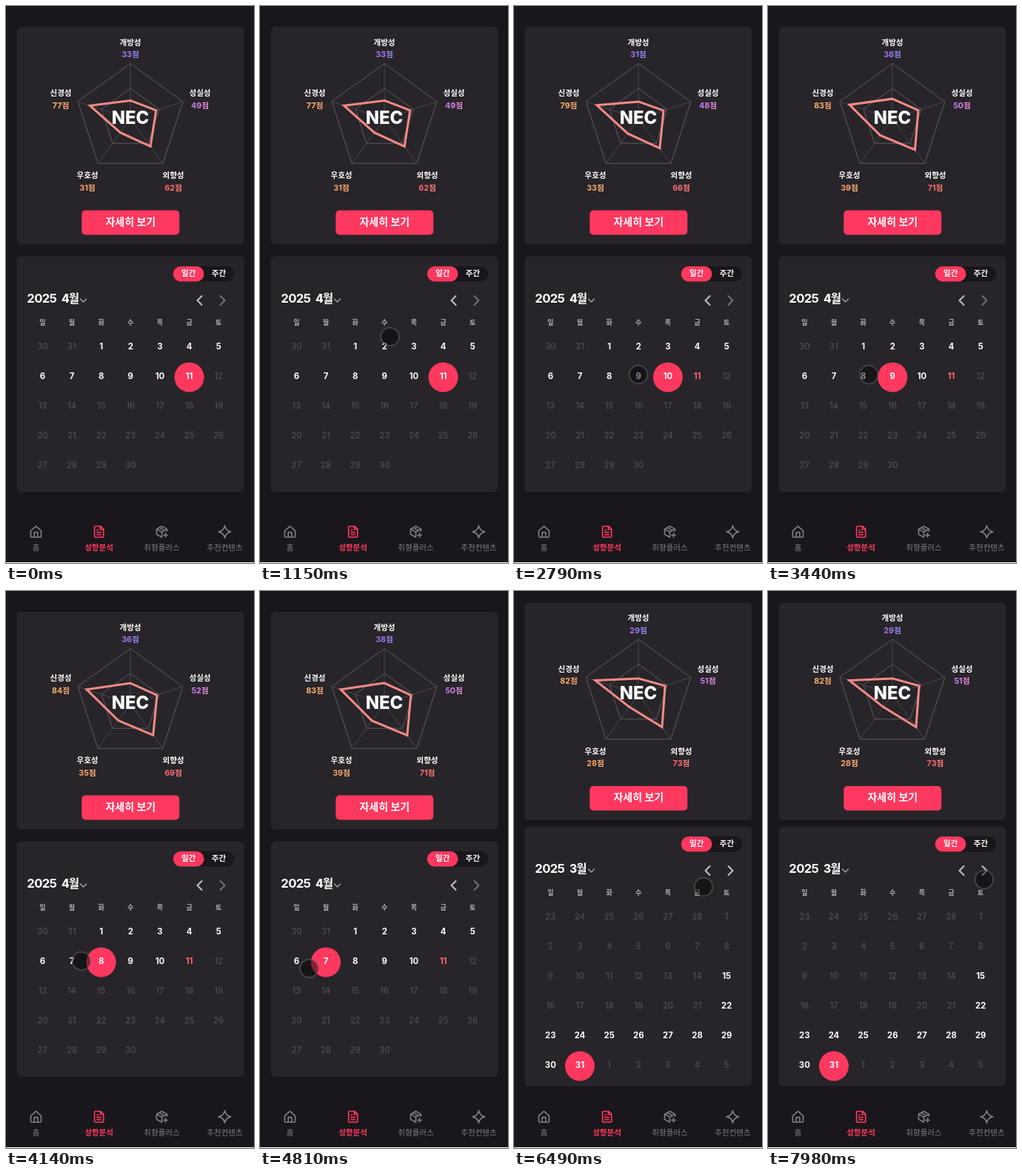
Write an HTML page with a canvas that moves like this. It is 335 px wide and 751 px high and loops after 8 s.

```html
<!DOCTYPE html>
<html lang="ko">
<head>
<meta charset="utf-8">
<title>성향분석</title>
<style>
  html, body { margin: 0; width: 100%; height: 100%; overflow: hidden; background: #19171b; }
  canvas { display: block; width: 335px; height: 751px; }
</style>
</head>
<body>
<canvas id="stage"></canvas>
<script>
const W = 335, H = 751, LOOP = 8000;
const canvas = document.getElementById('stage');
const ctx = canvas.getContext('2d');
const ratio = window.devicePixelRatio || 1;
canvas.width = W * ratio;
canvas.height = H * ratio;

const FAMILY = 'Inter, "Noto Sans CJK KR", "Noto Sans KR", "Noto Sans CJK", sans-serif';
const BG = '#19171b', CARD = '#272529', PINK = '#ff385f', DIM = '#4f4d52', GRAY = '#807e83';

// Scores run clockwise from the top of the chart.
const STATES = [
  { t: 0, day: 11, scores: [33, 49, 62, 31, 77] },
  { t: 2040, day: 10, scores: [31, 48, 66, 33, 79] },
  { t: 3000, day: 9, scores: [38, 50, 71, 39, 83] },
  { t: 3800, day: 8, scores: [36, 52, 69, 35, 84] },
  { t: 4350, day: 7, scores: [38, 50, 71, 39, 83] },
  { t: 5080, day: 6, scores: [34, 53, 71, 23, 84] },
  { t: 6360, day: 31, scores: [29, 51, 73, 28, 82], march: true },
];

// Pointer path: time, x, y. Repeated places are rests.
const PATH = [
  [660, 280, 564], [900, 215, 440], [1300, 166, 462], [1780, 206, 495], [2300, 206, 495],
  [2790, 168, 497], [3200, 168, 497], [3540, 128, 497], [3900, 128, 497],
  [4300, 88, 500], [4650, 88, 500], [4950, 49, 516], [5200, 49, 516],
  [5750, 193, 453], [6250, 256, 399], [6860, 256, 399],
  [7220, 264, 554], [7520, 264, 554], [7800, 296, 388], [7980, 292, 389],
];

const TRAITS = [
  { name: '개방성', x: 168, y: 49.5, colors: ['#a66cf0', '#8d8df2'] },
  { name: '성실성', x: 262, y: 118, colors: ['#b97cf5', '#f08ad8'] },
  { name: '외향성', x: 226, y: 229, colors: ['#ff5c70', '#ff8078'] },
  { name: '우호성', x: 110, y: 229, colors: ['#ff9a66', '#ffb27a'] },
  { name: '신경성', x: 74, y: 118, colors: ['#ffb765', '#ff9f70'] },
];

const TABS = [
  { label: '홈', x: 40.5, icon: 'M3 10.5 12 2.5l9 8V20a1.5 1.5 0 0 1-1.5 1.5h-15A1.5 1.5 0 0 1 3 20zM9 21.5V13h6v8.5' },
  { label: '성향분석', x: 125.5, active: true, icon: 'M6 2.5h9l5 5V20a1.5 1.5 0 0 1-1.5 1.5H6A1.5 1.5 0 0 1 4.5 20V4A1.5 1.5 0 0 1 6 2.5zM14.5 2.5V8H20M8.5 9h2.5M8.5 13h7M8.5 17h7' },
  { label: '취향플러스', x: 210.5, icon: 'M21 11V7.5L12 2.5 3 7.5v9L12 21.5M3 7.5l9 5 9-5M12 12.5v9M7.5 5l9 5M15 18h7M18.5 14.5v7' },
  { label: '추천컨텐츠', x: 295.5, icon: 'M12 1.5q1.8 8.7 10.5 10.5q-8.7 1.8-10.5 10.5q-1.8-8.7-10.5-10.5q8.7-1.8 10.5-10.5z' },
].map(tab => ({ ...tab, icon: new Path2D(tab.icon) }));

function text(str, x, y, size, color, weight = 700, align = 'center', spacing = 0) {
  ctx.font = `${weight} ${size}px ${FAMILY}`;
  ctx.letterSpacing = spacing + 'px';
  ctx.textAlign = align;
  ctx.textBaseline = 'middle';
  ctx.fillStyle = color;
  ctx.fillText(str, x, y);
}

function box(x, y, w, h, r, color) {
  ctx.beginPath();
  ctx.roundRect(x, y, w, h, r);
  ctx.fillStyle = color;
  ctx.fill();
}

function disc(x, y, r, color) {
  ctx.beginPath();
  ctx.arc(x, y, r, 0, Math.PI * 2);
  ctx.fillStyle = color;
  ctx.fill();
}

function line(points, color, width, closed = false) {
  ctx.beginPath();
  points.forEach(([x, y]) => ctx.lineTo(x, y));
  if (closed) ctx.closePath();
  ctx.strokeStyle = color;
  ctx.lineWidth = width;
  ctx.stroke();
}

const spoke = (i, share) => {
  const a = i * Math.PI * 2 / 5 - Math.PI / 2;
  return [168 + 74.5 * share * Math.cos(a), 152 + 74.5 * share * Math.sin(a)];
};
const ring = shares => shares.map((share, i) => spoke(i, share));
const easeInOut = p => p < 0.5 ? 4 * p ** 3 : 1 - 4 * (1 - p) ** 3;

function chartScores(index, t) {
  const state = STATES[index], before = STATES[index - 1];
  if (!before || state.march) return state.scores;
  const eased = easeInOut(Math.min(1, (t - state.t) / 750));
  return state.scores.map((s, i) => before.scores[i] + (s - before.scores[i]) * eased);
}

function drawChart(state, scores) {
  ctx.save();
  if (state.march) ctx.translate(0, -12.5);
  box(14.5, 28, 307, 293.5, 6, CARD);

  for (const share of [1, 0.55]) line(ring(Array(5).fill(share)), '#5d5b60', 1, true);
  for (let i = 0; i < 5; i++) line([[168, 152], spoke(i, 1)], '#48464b', 1);
  ctx.lineJoin = 'miter';
  line(ring(scores.map(s => s / 100)), '#f98a86', 3, true);
  text('NEC', 168, 151.7, 23.8, '#fff', 800);

  TRAITS.forEach(({ name, x, y, colors }, i) => {
    text(name, x, y, 10.5, '#fff', 800);
    const blend = ctx.createLinearGradient(x - 12, 0, x + 12, 0);
    colors.forEach((c, k) => blend.addColorStop(k, c));
    text(state.scores[i] + '점', x, y + 16.5, 10.7, blend);
  });

  box(102.3, 275.5, 132, 33, 5, PINK);
  text('자세히 보기', 168.3, 291.5, 14, '#fff');
  ctx.restore();
}

// In March only the 15th and the days from the 22nd on have results.
function dayCell(slot, march) {
  if (!march) {
    if (slot < 2) return { day: 30 + slot };
    return { day: slot - 1, open: slot <= 12, own: true };
  }
  if (slot < 6) return { day: 23 + slot };
  if (slot > 36) return { day: slot - 36 };
  const day = slot - 5;
  return { day, open: day === 15 || day >= 22, own: true };
}

function drawCalendar({ march, day: picked }) {
  ctx.save();
  if (march) ctx.translate(0, -20);
  box(14.5, 337.5, 307, march ? 350 : 317.5, 6, CARD);

  box(225.7, 351, 82.6, 20.5, 10.25, BG);
  box(225.7, 351, 41.8, 20.5, 10.25, PINK);
  text('일간', 246.7, 361, 10.5, '#fff', 800);
  text('주간', 287.5, 361, 10.5, '#fff', 800);

  text('2025', 28.3, 395, 16.6, '#fff', 700, 'left', -0.6);
  text(march ? '3월' : '4월', 75, 395, 15.5, '#fff', 800, 'left', -1);
  line([[100.5, 395], [104.5, 399], [108.5, 395]], '#a9a7ac', 1.4);
  line([[264.5, 391], [258.5, 397], [264.5, 403]], '#c4c2c6', 2);
  line([[289.5, 391], [295.5, 397], [289.5, 403]], march ? '#c4c2c6' : '#737176', 2);

  const column = i => 49.3 + 39.65 * i;
  [...'일월화수목금토'].forEach((d, i) => text(d, column(i), 427, 9, '#b5b3b7', 800));

  const slots = march ? 42 : 32;
  for (let slot = 0; slot < slots; slot++) {
    const { day, open, own } = dayCell(slot, march);
    const x = column(slot % 7), y = 459.3 + 40 * Math.floor(slot / 7);
    const chosen = own && day === picked;
    if (chosen) disc(x, y + 1.2, 20, PINK);
    const today = !march && own && day === 11 && !chosen;
    text(day, x, y, 11.3, today ? '#ff6670' : open ? '#fff' : DIM, open ? 700 : 500);
  }
  ctx.restore();
}

function drawTabs() {
  for (const { label, x, icon, active } of TABS) {
    const color = active ? PINK : GRAY;
    ctx.save();
    ctx.translate(x - 9.4, 699.5);
    ctx.scale(0.78, 0.78);
    ctx.strokeStyle = color;
    ctx.lineWidth = 2.1;
    ctx.stroke(icon);
    ctx.restore();
    text(label, x, 730.5, 10.5, color, active ? 800 : 500);
  }
}

const same = (a, b) => a[1] === b[1] && a[2] === b[2];

function slope(i, axis) {
  const a = PATH[i - 1], b = PATH[i], c = PATH[i + 1];
  if (!a || !c || same(a, b) || same(b, c)) return 0;
  return (c[axis] - a[axis]) / (c[0] - a[0]);
}

function pointerAt(t) {
  const next = PATH.findIndex(p => p[0] > t);
  if (next < 0) return PATH[PATH.length - 1].slice(1);
  const a = PATH[next - 1], b = PATH[next], span = b[0] - a[0];
  const u = (t - a[0]) / span, v = 1 - u;
  return [1, 2].map(k =>
    v * v * (1 + 2 * u) * a[k] + u * u * (3 - 2 * u) * b[k] +
    span * u * v * (v * slope(next - 1, k) - u * slope(next, k)));
}

function drawPointer(t) {
  if (t < PATH[0][0]) return;
  const [x, y] = pointerAt(t);
  const pressed = STATES.some(s => t > s.t - 60 && t < s.t + 120);
  const r = pressed ? 11.5 : 12.7;
  disc(x, y, r, 'rgba(0,0,0,.45)');
  ctx.beginPath();
  ctx.arc(x, y, r - 0.5, 0, Math.PI * 2);
  ctx.strokeStyle = 'rgba(125,122,128,.42)';
  ctx.lineWidth = 2;
  ctx.stroke();
}

function draw(now) {
  const t = (now - start) % LOOP;
  let index = STATES.length - 1;
  while (STATES[index].t > t) index--;
  const state = STATES[index];

  ctx.setTransform(ratio, 0, 0, ratio, 0, 0);
  ctx.lineCap = ctx.lineJoin = 'round';
  ctx.fillStyle = BG;
  ctx.fillRect(0, 0, W, H);
  drawChart(state, chartScores(index, t));
  drawCalendar(state);
  drawTabs();
  ctx.fillStyle = '#fff';
  ctx.fillRect(0, H - 1, W, 1);
  drawPointer(t);
}

function tick() {
  draw(performance.now());
  requestAnimationFrame(tick);
}

const start = performance.now();
tick();
</script>
</body>
</html>
```
